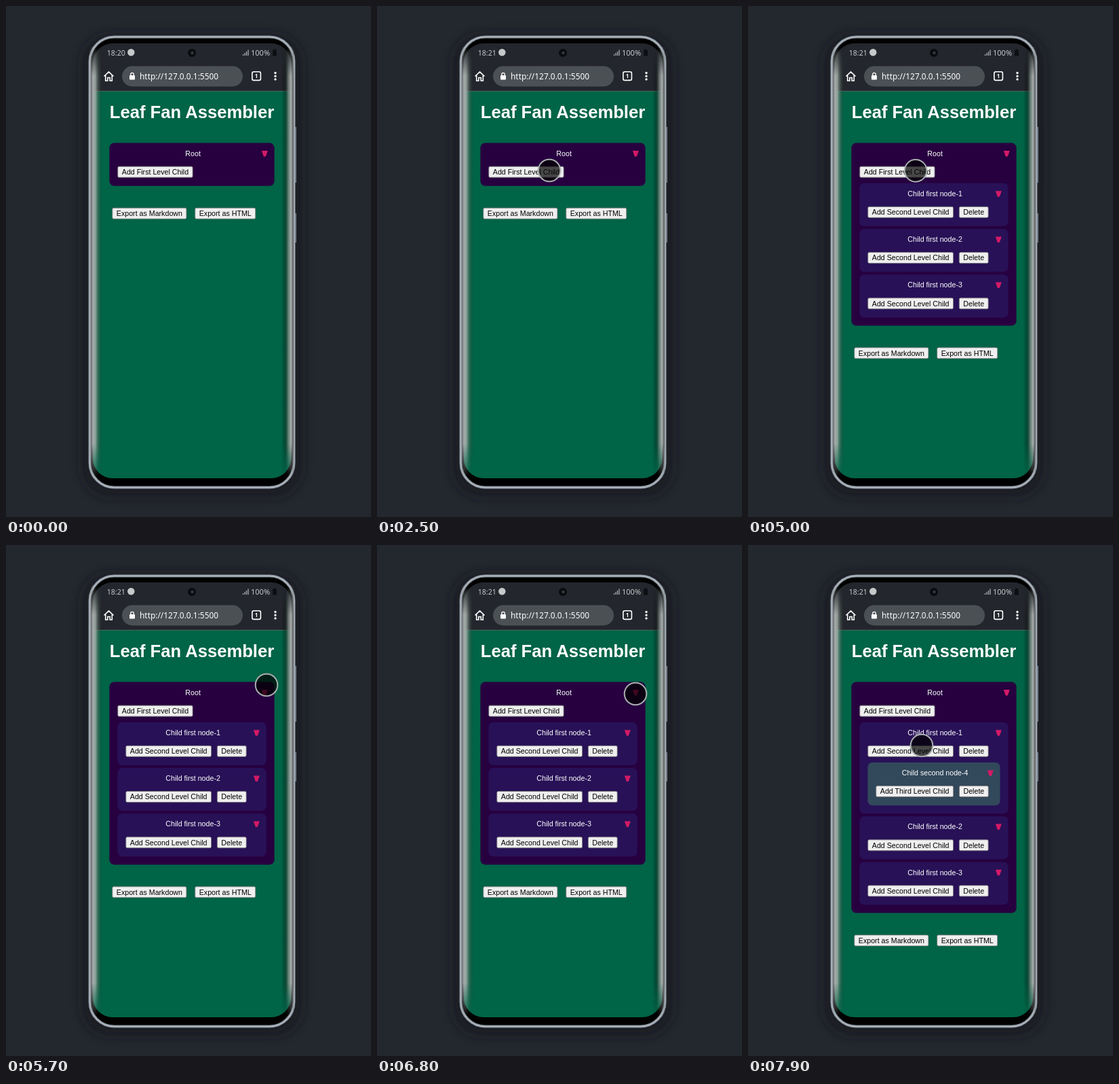
These frames come from a looping animation (538 px wide and 752 px high, 8000 ms). An HTML page:

```html
<!DOCTYPE html>
<html lang="en">
<head>
<meta charset="utf-8">
<title>Leaf Fan Assembler</title>
<style>
  html, body { margin: 0; width: 100%; height: 100%; overflow: hidden; background: #23272e; }
  svg { display: block; width: 100%; height: 100%; }
  .ui { font: 10.67px "Liberation Sans", Arial, sans-serif; }
  .bar { font-family: "Noto Sans", sans-serif; }
</style>
</head>
<body>
<svg viewBox="0 0 538 752" preserveAspectRatio="none">
  <defs>
    <filter id="blur" x="-20%" y="-20%" width="140%" height="140%"><feGaussianBlur stdDeviation="8"/></filter>
    <clipPath id="screen"><rect x="128" y="55" width="292" height="640" rx="29"/></clipPath>
    <linearGradient id="left">
      <stop offset="0" stop-color="#686c6e"/>
      <stop offset=".2" stop-color="#a4aaa9"/>
      <stop offset=".4" stop-color="#a4b0ab" stop-opacity=".85"/>
      <stop offset=".65" stop-color="#66756d" stop-opacity=".45"/>
      <stop offset="1" stop-color="#203028" stop-opacity="0"/>
    </linearGradient>
    <linearGradient id="right">
      <stop offset="0" stop-color="#000" stop-opacity="0"/>
      <stop offset=".3" stop-color="#0a1510" stop-opacity=".35"/>
      <stop offset=".55" stop-color="#78837e" stop-opacity=".8"/>
      <stop offset=".78" stop-color="#b0b5b4" stop-opacity=".95"/>
      <stop offset="1" stop-color="#4c5052"/>
    </linearGradient>
    <linearGradient id="ends" x2="0" y2="1">
      <stop offset="0" stop-color="#000"/>
      <stop offset=".07" stop-color="#fff"/>
      <stop offset=".92" stop-color="#fff"/>
      <stop offset="1" stop-color="#000"/>
    </linearGradient>
    <mask id="fade"><rect x="120" y="58" width="310" height="637" fill="url(#ends)"/></mask>
  </defs>

  <rect width="538" height="752" fill="#23272e"/>
  <rect x="112" y="42" width="324" height="680" rx="42" fill="#15181d" opacity=".65" filter="url(#blur)"/>
  <path d="M426.5 178V260M426.5 305V348" stroke="#717b87" stroke-width="3"/>
  <rect x="123.5" y="45.5" width="301" height="663" rx="36" fill="#000" stroke="#89929b" stroke-width="4"/>
  <rect x="123.5" y="45.5" width="301" height="663" rx="36" fill="none" stroke="#b4bbc4" stroke-width="1.3"/>

  <g clip-path="url(#screen)">
    <rect x="128" y="55" width="292" height="71" fill="#23262c"/>
    <rect x="128" y="125" width="292" height="570" fill="#006446"/>
    <path d="M128 125.3H420" stroke="#5b6b67" stroke-width=".8"/>
  </g>

  <g class="bar" fill="#c6c8ca" font-size="10.6">
    <text id="clock" x="148.700" y="73">18:20</text>
    <circle cx="184.300" cy="68.300" r="5.200"/>
    <text x="361" y="73" font-size="11">100%</text>
    <path d="M349.500 73V71M352 73V69M354.500 73V67M357 73V64.500" stroke="#a9abad" stroke-width="1.300"/>
    <path d="M393 65h1.500v-1.500h3V65H399v8.500h-6z" fill="#0d0f12"/>
    <circle cx="274" cy="69" r="6" fill="#0b0c0f"/>
    <circle cx="274.500" cy="69" r="2.200" fill="#333840"/>
  </g>

  <g fill="none" stroke="#fff" stroke-width="1.600">
    <rect x="171" y="88.500" width="178" height="30" rx="15" fill="#4b5055" stroke="none"/>
    <path d="M144.500 103.500L151.500 96.800L158.500 103.500M146.700 102V110H149.800V105.500H153.200V110H156.300V102"/>
    <path d="M183.800 102.500V100.500a2.200 2.200 0 0 1 4.400 0V102.500" stroke-width="1.300"/>
    <rect x="182" y="102" width="8" height="6.500" rx="1" fill="#fff" stroke="none"/>
    <rect x="362.800" y="96.800" width="12.600" height="12.600" rx="2.500"/>
    <path d="M397 98.500h.01M397 103.200h.01M397 107.900h.01" stroke-width="3.400" stroke-linecap="round"/>
  </g>
  <g class="bar" fill="#fff">
    <text x="197" y="107.700" font-size="11.900">http://127.0.0.1:5500</text>
    <text x="369.100" y="106" font-size="8" font-weight="700" text-anchor="middle">1</text>
  </g>

  <text class="ui" x="274" y="165" text-anchor="middle" fill="#fff" style="font-size:25.6px;font-weight:700">Leaf Fan Assembler</text>
  <g id="page" class="ui"></g>

  <g mask="url(#fade)">
    <rect x="125" y="58" width="17" height="637" fill="url(#left)"/>
    <rect x="406" y="58" width="18" height="637" fill="url(#right)"/>
  </g>
  <circle id="cursor" r="16.300" fill="#000" fill-opacity=".7" stroke="#a9afb0" stroke-width="2"/>
</svg>
<script>
const LOOP = 8000, STEP = 100;
const FILLS = ["#270040", "#281157", "#32485b"];
const LEVELS = ["First", "Second", "Third"];
const MID = 275.6;

// time, x, y
const PATH = [
  [900, 400, 213], [1200, 342, 197], [1500, 293, 200], [1800, 276, 214],
  [2500, 254, 242], [2900, 241, 244], [4900, 241, 244],
  [5700, 384, 206], [6000, 381, 219], [6800, 381, 219], [7600, 256, 295]
];

const $ = id => document.getElementById(id);
const pen = document.createElement("canvas").getContext("2d");
pen.font = '10.67px "Liberation Sans", Arial, sans-serif';

function button(x, y, label) {
  const w = pen.measureText(label).width + 12.8;
  return {
    end: x + w,
    svg: `<rect x="${x + .4}" y="${y + .4}" width="${w - .8}" height="16" rx="1.8" fill="#efefef" stroke="#777" stroke-width=".8"/>
      <text x="${x + 6.4}" y="${y + 12.2}">${label}</text>`
  };
}

function arrow(x, y, up) {
  const s = up ? -1 : 1;
  return `<path d="M${x - 4.5} ${y - 4 * s}h9l-3 ${8.5 * s}h-3z" fill="#d31a66"/>`;
}

function node(item, level, y) {
  const x = 152.4 + 12 * level, w = 2 * (MID - x) - 3.2 + 0;
  let h = 30, body = "";
  if (!item.closed) {
    const add = button(x + 12, y + 34.2, `Add ${LEVELS[level]} Level Child`);
    body = add.svg;
    if (level) body += button(add.end + 8, y + 34.2, "Delete").svg;
    h = 63.2;
    let top = y + 59.2;
    for (const kid of item.kids || []) {
      const box = node(kid, level + 1, top);
      body += box.svg;
      h = top + box.h + 12 - y;
      top += box.h + 4;
    }
  }
  return {
    h,
    svg: `<rect x="${x}" y="${y}" width="${w}" height="${h}" rx="7" fill="${FILLS[level]}"/>
      <text x="${MID}" y="${y + 19.2}" fill="#fff" text-anchor="middle">${item.name}</text>
      ${arrow(x + w - 14.3, y + 15.4, item.closed)}${body}`
  };
}

function tree(t) {
  const kids = [2900, 4000, 4900].filter(at => t >= at)
    .map((_, i) => ({ name: "Child first node-" + (i + 1) }));
  if (t >= 7800) kids[0].kids = [{ name: "Child second node-4" }];
  return { name: "Root", kids, closed: t >= 6200 && t < 6800 };
}

function cursorAt(t) {
  const i = PATH.findIndex(p => p[0] > t);
  if (i < 0) return PATH[PATH.length - 1].slice(1);
  const [t0, x0, y0] = PATH[i - 1], [t1, x1, y1] = PATH[i];
  let k = (t - t0) / (t1 - t0);
  if (t >= 4900) k = k * k * (3 - 2 * k);
  return [x0 + (x1 - x0) * k, y0 + (y1 - y0) * k];
}

let shown = "";
function draw(t) {
  const root = tree(t), key = JSON.stringify(root);
  if (key !== shown) {
    shown = key;
    const box = node(root, 0, 201.6), y = 201.6 + box.h + 32;
    const md = button(156.4, y, "Export as Markdown");
    $("page").innerHTML = box.svg + md.svg + button(md.end + 12, y, "Export as HTML").svg;
  }
  $("clock").textContent = t < 1800 ? "18:20" : "18:21";
  const cursor = $("cursor"), on = t >= PATH[0][0];
  cursor.setAttribute("visibility", on ? "visible" : "hidden");
  if (on) cursor.setAttribute("transform", `translate(${cursorAt(t)})`);
}

const start = performance.now();
function tick() {
  const t = (performance.now() - start) % LOOP;
  draw(Math.floor(t / STEP) * STEP);
  requestAnimationFrame(tick);
}
tick();
</script>
</body>
</html>
```
